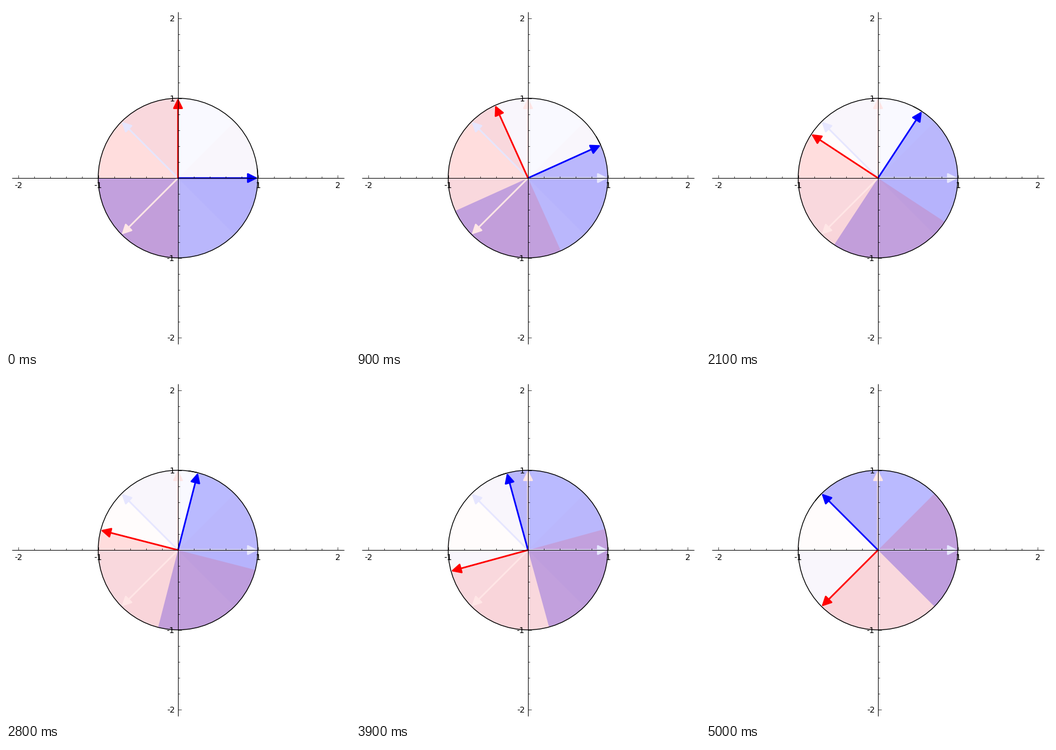
These frames come from a looping animation (584 by 584 pixels, 6 s). A matplotlib script:

```python
import matplotlib.pyplot as plt
import numpy as np
from matplotlib.animation import FuncAnimation
from matplotlib.patches import Arc, Circle, FancyArrowPatch, Wedge

SIZE, DPI, UNIT = 584, 100, 135.5
CX, CY = 292, 291.9          # origin in pixels, from bottom left
END, STEPS, HOLD = 135, 50, 10
REACH = 2.08

plt.rcParams["font.family"] = "DejaVu Sans"
fig = plt.figure(figsize=(SIZE / DPI, SIZE / DPI), dpi=DPI, facecolor="white")
ax = fig.add_axes([0, 0, 1, 1])
ax.set_xlim(-CX / UNIT, (SIZE - CX) / UNIT)
ax.set_ylim(-CY / UNIT, (SIZE - CY) / UNIT)
ax.axis("off")


def tip(deg):
    a = np.radians(deg)
    return np.cos(a), np.sin(a)


def half_disk(start, color, alpha, z):
    wedge = Wedge((0, 0), 1, start, start + 180, fc=color, ec="none",
                  lw=0, alpha=alpha, zorder=z)
    return ax.add_patch(wedge)


def arrow(deg, color, z):
    patch = FancyArrowPatch((0, 0), tip(deg), lw=2, fc=color, ec=color,
                            arrowstyle="-|>,head_width=5,head_length=10",
                            mutation_scale=1, shrinkA=0, shrinkB=0, zorder=z)
    return ax.add_patch(patch)


def stroke(xs, ys, width):
    ax.plot(xs, ys, color="black", lw=width, zorder=8,
            solid_capstyle="butt")


def draw_axes():
    stroke([-REACH, REACH], [0, 0], 0.72)
    stroke([0, 0], [-REACH, REACH], 0.72)
    for k in range(-10, 11):
        if k == 0:
            continue
        v = k / 5
        major = k % 5 == 0
        length = (5.5 if major else 2.8) / UNIT
        stroke([v, v], [0, length], 0.5)
        stroke([0, length], [v, v], 0.5)
        if major:
            name = str(k // 5)
            ax.text(v, -17 / UNIT, name, size=10, ha="center",
                    va="baseline", zorder=9)
            ax.text(-5.5 / UNIT, v - 5 / UNIT, name, size=10, ha="right",
                    va="baseline", zorder=9)


# Pale start and end positions
for angle in (0, END):
    half_disk(angle - 180, "blue", 0.025, 1)
    half_disk(angle + 90, "red", 0.01, 3)
    arrow(angle, "#e6e6ff", 6)
    arrow(angle + 90, "#ffe6e6", 6)

blue_half = half_disk(-180, "blue", 0.25, 2)
red_half = half_disk(90, "red", 0.12, 4)
ax.add_patch(Circle((0, 0), 1, fill=False, ec="black", lw=1, zorder=5))
overlap = ax.add_patch(Arc((0, 0), 2, 2, theta1=0, theta2=7,
                           ec="black", lw=1, zorder=5))
blue_arrow = arrow(0, "blue", 7)
red_arrow = arrow(90, "red", 7)
draw_axes()


def update(i):
    angle = END * min(i, STEPS) / STEPS
    blue_half.set_theta1(angle - 180)
    blue_half.set_theta2(angle)
    red_half.set_theta1(angle + 90)
    red_half.set_theta2(angle + 270)
    overlap.set_angle(angle)
    blue_arrow.set_positions((0, 0), tip(angle))
    red_arrow.set_positions((0, 0), tip(angle + 90))
    return blue_half, red_half, overlap, blue_arrow, red_arrow


anim = FuncAnimation(fig, update, frames=STEPS + HOLD, interval=100,
                     repeat=True, repeat_delay=0, blit=False)
plt.show()
```
